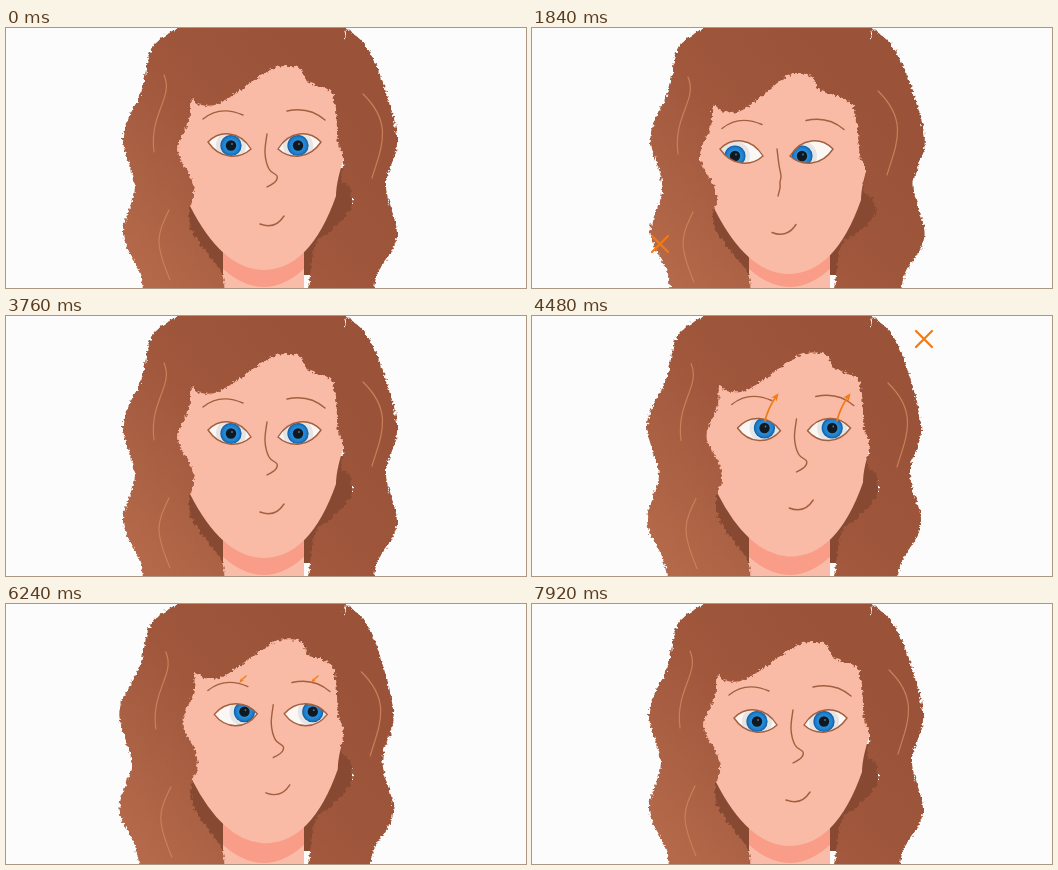
An HTML page that plays this animation: 520 px wide and 260 px high, repeating every 8000 ms.

```html
<!DOCTYPE html>
<html lang="en">
<head>
<meta charset="utf-8">
<title>Eye movement</title>
<style>
html, body { margin: 0; width: 100%; height: 100%; overflow: hidden; background: #fcfcfc; }
svg { display: block; width: 520px; height: 260px; }
.line { fill: none; stroke: #a3603f; stroke-width: 1.4; stroke-linecap: round; }
.strand { fill: none; stroke: #cb8059; stroke-width: 1.2; stroke-linecap: round; }
.mark { fill: none; stroke: #f27a12; stroke-linecap: round; }
</style>
</head>
<body>
<svg viewBox="0 0 520 260">
  <defs>
    <linearGradient id="hairFill" gradientUnits="userSpaceOnUse" x1="130" y1="240" x2="330" y2="70">
      <stop offset="0" stop-color="#b4694a"/>
      <stop offset=".55" stop-color="#a0573c"/>
      <stop offset="1" stop-color="#9a5339"/>
    </linearGradient>
    <radialGradient id="irisFill">
      <stop offset=".45" stop-color="#2a93dd"/>
      <stop offset=".8" stop-color="#1d7dcb"/>
      <stop offset="1" stop-color="#12579c"/>
    </radialGradient>
    <filter id="fuzz" filterUnits="userSpaceOnUse" x="90" y="-20" width="330" height="310" color-interpolation-filters="sRGB">
      <feTurbulence type="fractalNoise" baseFrequency=".3" numOctaves="2" seed="4"/>
      <feDisplacementMap in="SourceGraphic" scale="6" xChannelSelector="R" yChannelSelector="G"/>
    </filter>
  </defs>
  <rect width="520" height="260" fill="#fcfcfc"/>
  <rect x="176" y="140" width="170" height="107" fill="#874932"/>
  <path d="M217 200H298V262H217Z" fill="#f9bca9"/>
  <path d="M217 200H298V241Q258 277 217 241Z" fill="#fa9d88"/>
  <path id="face" d="M168 25H340V125Q330 152 330 168Q304 242 257 242Q216 241 184 178L168 125Z" fill="#f9baa6"/>
  <g id="features"></g>
  <path id="hair" fill="url(#hairFill)" fill-rule="evenodd" filter="url(#fuzz)"/>
  <g id="strands"></g>
  <g id="marks"></g>
</svg>
<script>
const LOOP = 8000, PHASE = 2000, STEP = 80;
const $ = id => document.getElementById(id);

function add(parent, tag, attrs) {
  const el = document.createElementNS("http://www.w3.org/2000/svg", tag);
  for (const k in attrs) el.setAttribute(k, attrs[k]);
  return parent.appendChild(el);
}
const clamp = x => Math.max(0, Math.min(1, x));
const ramp = (s, a, b) => clamp((s - a) / (b - a));
const smooth = x => x * x * (3 - 2 * x);
const mix = (a, b, k) => a + (b - a) * k;

// p runs from -1 (down-left) through 0 (ahead) to 1 (up-right).
const lean = (down, up, p) => p < 0 ? -p * down : p * up;
const shift = (down, up, p) => [lean(down[0], up[0], p), lean(down[1], up[1], p)];
const move = ([x, y]) => `translate(${x} ${y})`;

// Smooth curve through points.
function spline(pts) {
  const at = i => pts[Math.max(0, Math.min(pts.length - 1, i))];
  let d = "M" + pts[0];
  for (let i = 0; i < pts.length - 1; i++) {
    const [a, b, c, e] = [at(i - 1), at(i), at(i + 1), at(i + 2)];
    d += `C${b[0] + (c[0] - a[0]) / 6} ${b[1] + (c[1] - a[1]) / 6} `
       + `${c[0] - (e[0] - b[0]) / 6} ${c[1] - (e[1] - b[1]) / 6} ${c[0]} ${c[1]}`;
  }
  return d;
}

const hairOuter = [
  [139, 275], [133, 243], [117, 205], [129, 159], [117, 108], [136, 62], [146, 19], [174, -2],
  [180, -12], [325, -12], [338, 11], [343, 3], [367, 30], [391, 108], [380, 157], [391, 208],
  [371, 247], [367, 275]
];
const hairInner = [
  [217, 275], [216, 246], [188, 206], [183, 182], [188, 168], [185, 150], [172, 122], [183, 92],
  [185, 72], [195, 77], [216, 74], [262, 43], [283, 38], [296, 42], [302, 54], [327, 67],
  [332, 115], [338, 130], [335, 151], [343, 158], [345, 180], [325, 203], [310, 215], [304, 247],
  [300, 275]
];

// The sides of the hair sway; the top stays put.
const outerPoint = p => ([x, y]) => [x + lean(1.5, -4, p) * clamp(y / 100), y];

// The parting slides furthest, the ends near the neck not at all.
const innerPoint = p => ([x, y]) => {
  const w = 1 - ramp(y, 150, 225);
  const parting = y < 80 ? Math.exp(-(((x - 287) / 32) ** 2)) : 0;
  const side = ramp(x, 180, 340);
  return [
    x + w * lean(-4 - 12 * parting, 5 - 5 * side, p),
    y + w * lean(6 + 6 * side - 3 * parting, -3, p)
  ];
};

const brow = add($("features"), "path", { class: "line", d: "M197 91Q214 77 237 87M281 83Q303 78 319 92" });
const mouth = add($("features"), "path", { class: "line", d: "M254 196Q269 202 278 188" });
const nose = add($("features"), "path", { class: "line" });
const noseAhead = [[261, 106], [259, 125], [263, 141], [271, 148], [269, 154], [261, 159]];
const noseDown = [[245, 121], [247, 137], [249, 148], [248, 154], [248, 160], [246, 168]];

const eyes = [0, 1].map(right => {
  const g = $("features");
  const clip = add(add(g, "clipPath", { id: "lid" + right }), "path", {});
  const white = add(g, "path", { fill: "#fbf7f4" });
  const ball = add(g, "g", { "clip-path": `url(#lid${right})` });
  const iris = add(ball, "g", {});
  add(iris, "circle", { r: 15, fill: "#9aa6ac", opacity: .22 });
  add(iris, "circle", { r: 10.6, fill: "url(#irisFill)" });
  add(iris, "circle", { r: 5.2, fill: "#101820" });
  add(iris, "circle", { cx: 1, cy: -1.5, r: .9, fill: "#66747d" });
  const rim = add(g, "path", { class: "line" });
  return { right, iris, outlines: [clip, white, rim] };
});

const leftStrands = add($("strands"), "path", {
  class: "strand",
  d: "M158 47C168 70 143 85 148 124M163 182C151 207 148 214 164 252"
});
const rightStrand = add($("strands"), "path", { class: "strand", d: "M357 66C388 96 375 120 366 150" });

// One curve (start, bend, end) per phase; the second eye's arrow is 72 px to the right.
const arrowPaths = [
  [[209, 131], [194, 138], [188, 154]],
  [[190, 150], [196, 136], [212, 129]],
  [[233, 105], [238, 84], [256, 67]],
  [[240, 72], [228, 82], [224, 98]]
];
const arrows = [0, 72].map(dx => {
  const g = add($("marks"), "g", { transform: move([dx, 0]) });
  return {
    g,
    shaft: add(g, "path", { class: "mark" }),
    head: add(g, "path", { fill: "#f27a12", d: "M0 0L-11 -4.6L-8.5 0L-11 4.6Z" })
  };
});
const cross = add($("marks"), "path", { class: "mark", "stroke-width": 2.2, d: "M-8 -8L8 8M8 -8L-8 8" });

function lidPath(ax, ay, bx, by, top, bottom) {
  const mid = (ay + by) / 2;
  const up = top - (mid - top) / 3, low = bottom + (bottom - mid) / 3;
  const x1 = mix(ax, bx, .27), x2 = mix(ax, bx, .73);
  return `M${ax} ${ay}C${x1} ${up} ${x2} ${up} ${bx} ${by}C${x2} ${low} ${x1} ${low} ${ax} ${ay}Z`;
}

function drawEye({ right, iris, outlines }, p) {
  const [dx, dy] = shift([-14, 7], [7, -7], p);
  const flip = x => (right ? 517 - x : x) + dx;
  const outerY = 114 + lean(7, -4, p), innerY = 121 + lean(7, -12.5, p);
  const d = lidPath(flip(202), outerY, flip(245), innerY, 106 + dy, 128 + dy);
  outlines.forEach(el => el.setAttribute("d", d));
  const [ix, iy] = shift([-22, 10.5], [15 + right * 1.5, -11], p);
  iris.setAttribute("transform", move([(right ? 292 : 225) + ix, 117.5 + iy]));
}

function drawHead(p) {
  const outer = spline(hairOuter.map(outerPoint(p)));
  const inner = spline(hairInner.map(innerPoint(p)));
  $("hair").setAttribute("d", outer + "Z" + inner + "Z");

  const place = (el, down, up) => el.setAttribute("transform", move(shift(down, up, p)));
  place($("face"), [-1, 4], [2, -3]);
  place(brow, [-7, 9.5], [5.5, -5]);
  place(mouth, [-14, 8.5], [6.5, -8]);
  place(leftStrands, [-2, 2], [2, 1]);
  place(rightStrand, [-11, -3], [-2, 2]);

  const [nx, ny] = shift([0, 0], [7, -6], p);
  const k = clamp(-p);
  nose.setAttribute("d", spline(noseAhead.map(([x, y], i) =>
    [mix(x, noseDown[i][0], k) + nx, mix(y, noseDown[i][1], k) + ny])));
  eyes.forEach(eye => drawEye(eye, p));
}

function drawArrows(phase, s) {
  const [a, b, c] = arrowPaths[phase];
  const at = u => [0, 1].map(i => mix(mix(a[i], b[i], u), mix(b[i], c[i], u), u));
  const tip = Math.sin(ramp(s, 80, 880) * Math.PI / 2);
  const tail = smooth(ramp(s, 1180, 1800));
  const size = mix(.55, 1, ramp(s, 300, 850));
  const shown = tip > .02 && tail < .98;

  const end = Math.max(tail, tip - .15);
  let d = "";
  for (let i = 0; i <= 10; i++) d += (i ? "L" : "M") + at(mix(tail, end, i / 10));
  const [x, y] = at(tip), [px, py] = at(tip - .12);
  const turn = Math.atan2(y - py, x - px) * 180 / Math.PI;
  const fit = size * Math.min(1, (tip - tail) * 2.5);

  for (const { g, shaft, head } of arrows) {
    g.setAttribute("visibility", shown ? "visible" : "hidden");
    shaft.setAttribute("d", d);
    shaft.setAttribute("stroke-width", 2.4 * size);
    head.setAttribute("transform", `${move([x, y])} rotate(${turn}) scale(${fit})`);
  }
}

function drawCross(phase, s) {
  const fade = ramp(s, 80, 240);
  cross.setAttribute("transform", move(phase > 1 ? [392, 23] : [128, 216]));
  cross.setAttribute("opacity", phase % 2 ? 1 - fade : fade);
}

function draw(time) {
  const t = Math.floor((time % LOOP) / STEP) * STEP;
  const phase = Math.floor(t / PHASE), s = t % PHASE;
  const k = smooth(ramp(s, 80, 880));
  drawHead([-k, k - 1, k, 1 - k][phase]);
  drawArrows(phase, s);
  drawCross(phase, s);
}

const start = performance.now();
function tick() {
  draw(performance.now() - start);
  requestAnimationFrame(tick);
}
draw(0);
requestAnimationFrame(tick);
</script>
</body>
</html>
```
